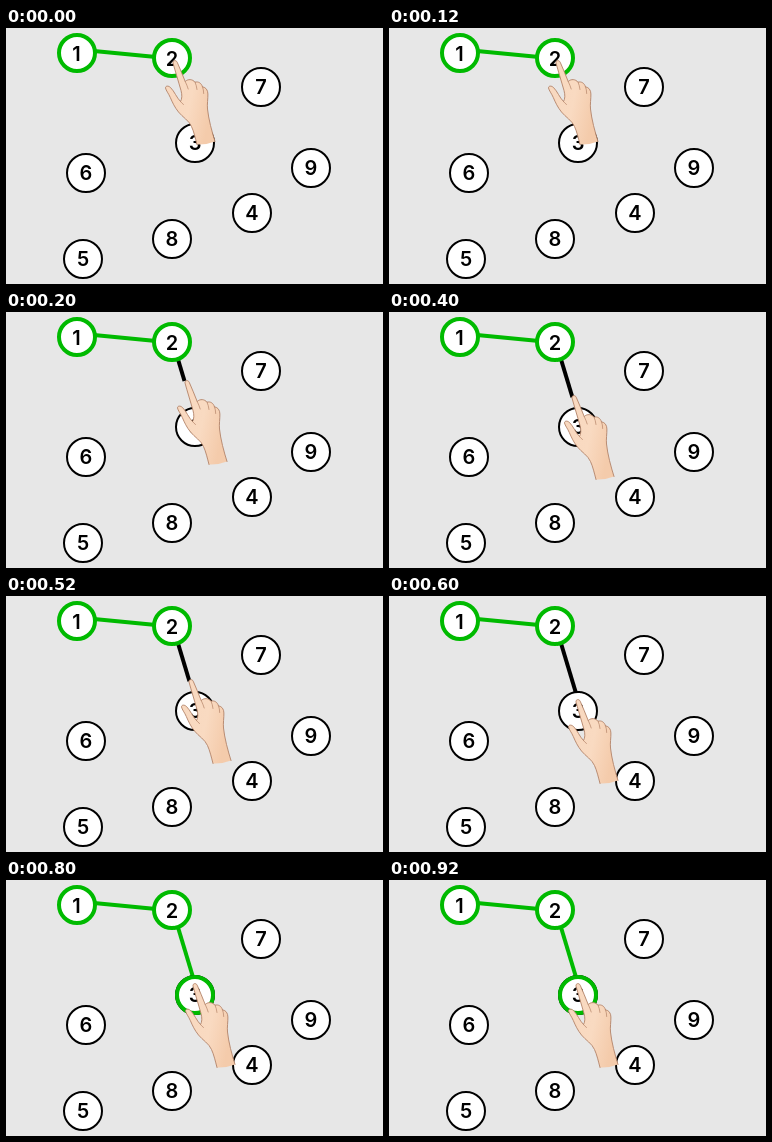
Recreate the animation shown at these times as an HTML page. Size 377 px wide and 256 px high, loop 1 s.

```html
<!DOCTYPE html>
<html lang="en">
<head>
<meta charset="utf-8">
<title>Connect the numbers</title>
<style>
  html, body { margin: 0; width: 100%; height: 100%; overflow: hidden; background: #e7e7e7; }
  svg { display: block; width: 377px; height: 256px; }
  .dot { fill: #fff; stroke: #000; stroke-width: 2; }
  .done { stroke: #00ba00; stroke-width: 4; }
  .link { fill: none; stroke-width: 4; }
  text { font: 600 20px Inter, Arial, sans-serif; text-anchor: middle; }

  .hand { animation: move 1s step-end infinite; }
  .drag { stroke: #000; animation: drag 1s step-end infinite; }
  .join { visibility: hidden; animation: join 1s step-end infinite; }

  @keyframes move {
    0% { transform: translate(0, 0); }
    20% { transform: translate(12px, 36px); }
    40% { transform: translate(16px, 51px); }
    60%, 100% { transform: translate(20px, 71px); }
  }
  @keyframes drag {
    0% { visibility: hidden; stroke-dashoffset: 54; }
    20% { visibility: visible; stroke-dashoffset: 30; }
    40% { visibility: visible; stroke-dashoffset: 13; }
    60% { visibility: visible; stroke-dashoffset: 0; }
    80%, 100% { visibility: hidden; stroke-dashoffset: 0; }
  }
  @keyframes join {
    0% { visibility: hidden; }
    80%, 100% { visibility: visible; }
  }
</style>
</head>
<body>
<svg viewBox="0 0 377 256">
  <defs>
    <linearGradient id="skin" x1="0" y1="0" x2="1" y2="0.35">
      <stop offset="0" stop-color="#f8d8bf"/>
      <stop offset="0.6" stop-color="#f9dac1"/>
      <stop offset="1" stop-color="#f4cbab"/>
    </linearGradient>
  </defs>

  <path class="link" stroke="#00ba00" d="M88 23L150 29"/>
  <path class="link drag" stroke-dasharray="54 60" d="M171.6 46L187.1 97.5"/>
  <path class="link join" stroke="#00ba00" d="M171.6 46L187.1 97.5"/>

  <g>
    <circle class="dot done" cx="71" cy="25" r="18"/>
    <circle class="dot done" cx="166" cy="30" r="18"/>
    <circle class="dot" cx="189" cy="115" r="19"/>
    <circle class="dot done join" cx="189" cy="115" r="18"/>
    <circle class="dot" cx="246" cy="185" r="19"/>
    <circle class="dot" cx="77" cy="231" r="19"/>
    <circle class="dot" cx="80" cy="145" r="19"/>
    <circle class="dot" cx="255" cy="59" r="19"/>
    <circle class="dot" cx="166" cy="211" r="19"/>
    <circle class="dot" cx="305" cy="140" r="19"/>
  </g>
  <g>
    <text x="70.5" y="33">1</text>
    <text x="166" y="38">2</text>
    <text x="189" y="122">3</text>
    <text x="246" y="192">4</text>
    <text x="77" y="238">5</text>
    <text x="80" y="152">6</text>
    <text x="255" y="66">7</text>
    <text x="166" y="218">8</text>
    <text x="305" y="147">9</text>
  </g>

  <g class="hand">
    <path fill="url(#skin)" d="M167 35C166.600 32.400 170 31.600 171.200 34.200C174 40.500 176.600 47 179.200 53.500C182 50.800 186.500 51 189 54.200C192.500 53.200 195.300 55.200 196.500 58.800C200 59.500 201.800 62 201.900 66C202 71 201 76 201.500 81C202.500 91 206 104 209 113.500Q200 117 191 116.500C189.300 110 188 104 185.500 98.500C183 92.500 176.500 89 172.500 84C168.500 79 166.500 74.500 164.300 69.500C162.600 65.500 160 62.500 159.500 60C159.400 57.600 162.500 57.600 164.500 59.500C168.500 63.500 170.500 69.500 174.500 73.500C176 71 176.300 67 175 62.500C172.600 54 169.500 44 167 35Z"/>
    <g fill="none" stroke="#b38368" stroke-width="0.9" stroke-linecap="round" stroke-linejoin="round">
      <path d="M191 116.500C189.300 110 188 104 185.500 98.500C183 92.500 176.500 89 172.500 84C168.500 79 166.500 74.500 164.300 69.500C162.600 65.500 160 62.500 159.500 60C159.400 57.600 162.500 57.600 164.500 59.500C168.500 63.500 170.500 69.500 174.500 73.500C176 71 176.300 67 175 62.500C172.600 54 169.500 44 167 35C166.600 32.400 170 31.600 171.200 34.200C174 40.500 176.600 47 179.200 53.500C182 50.800 186.500 51 189 54.200C192.500 53.200 195.300 55.200 196.500 58.800C200 59.500 201.800 62 201.900 66C202 71 201 76 201.500 81C202.500 91 206 104 209 113.500"/>
      <path stroke-width="0.7" d="M179.200 53.500Q181 57 182.200 61M189 54.200Q190.500 57 191 61.500M196.500 58.800Q197.600 61.500 197.700 65.500M174.500 73.500Q176 75.500 177.500 76.500"/>
    </g>
  </g>
</svg>
</body>
</html>
```
